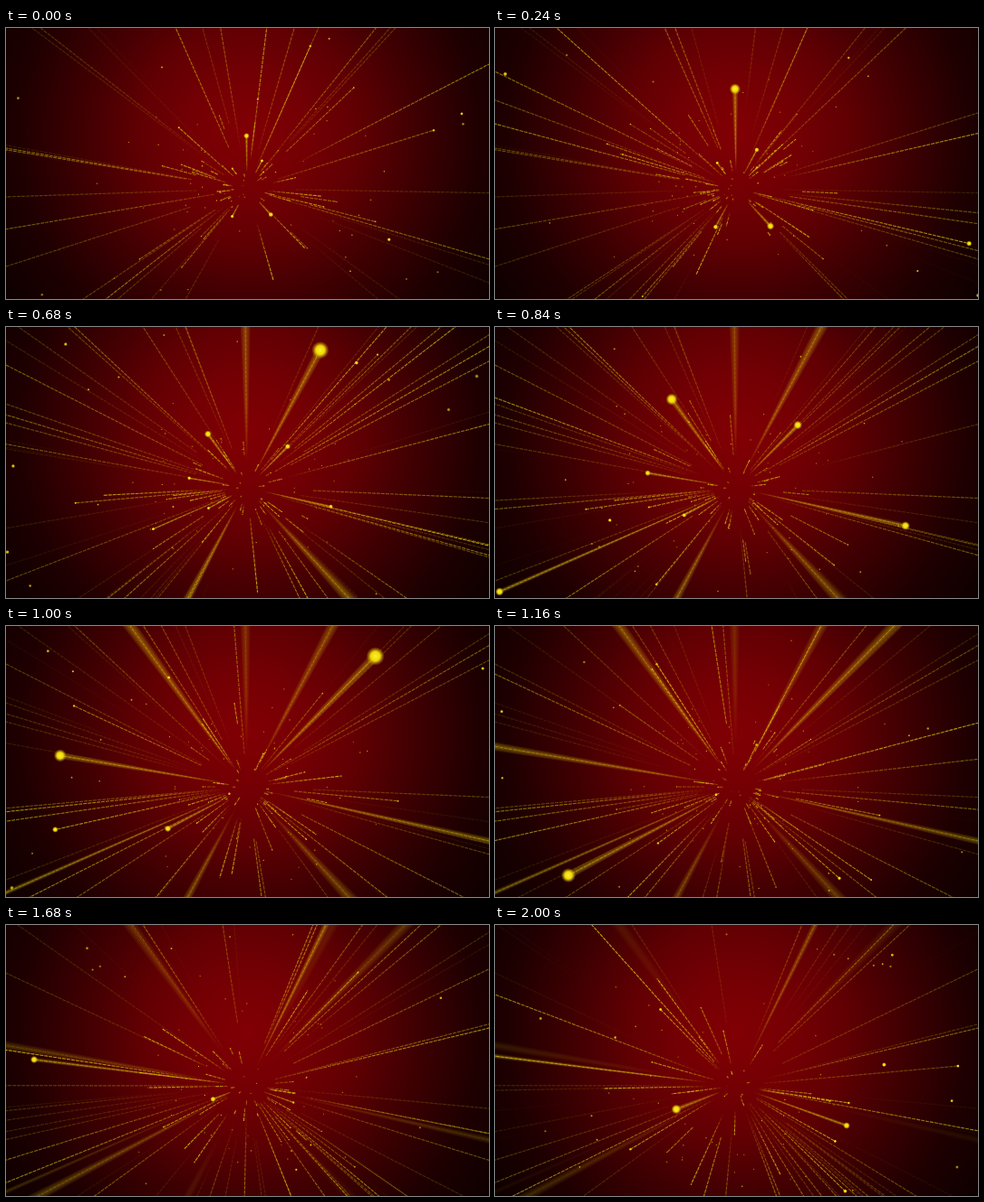
These frames come from a looping animation (533 px wide and 300 px high, 2.04 s). An HTML page with a canvas:

```html
<!DOCTYPE html>
<html lang="en">
<head>
<meta charset="utf-8">
<title>Golden burst</title>
<style>
  html, body { margin: 0; width: 100%; height: 100%; overflow: hidden; background: #0e0000; }
  canvas { display: block; width: 533px; height: 300px; }
</style>
</head>
<body>
<canvas id="stage" width="533" height="300"></canvas>
<script>
const W = 533, H = 300, CX = 266, CY = 178;
const STEP = 40, STEPS = 51, FAR = 340;
const ctx = document.getElementById('stage').getContext('2d');

// The largest sparks; their trails linger as broad beams
const comets = [
  { step: 9, x: 264, y: -20, size: 8 },
  { step: 12, x: 335, y: 253, size: 5.5 },
  { step: 17, x: 190, y: 320, size: 7 },
  { step: 18, x: 371, y: -20, size: 9 },
  { step: 21, x: 195, y: 80, size: 4.8 },
  { step: 21, x: 453, y: 220, size: 3.6 },
  { step: 21, x: 5, y: 293, size: 3.4 },
  { step: 26, x: 460, y: -20, size: 10 },
  { step: 26, x: -20, y: 130, size: 7 },
  { step: 29, x: 81, y: 276, size: 5.8 },
  { step: 36, x: 310, y: 88, size: 2.4 },
  { step: 42, x: 31, y: 149, size: 3 },
  { step: 50, x: 388, y: 222, size: 2.8 },
  { step: 50, x: 200, y: 204, size: 4 }
];

let seed = 7;
function rand(lo, hi) {
  seed = (seed * 16807) % 2147483647;
  return lo + (hi - lo) * seed / 2147483647;
}
function times(n, make) {
  for (let i = 0; i < n; i++) make(i);
}

// Random points in a wide box give more rays to the sides than up and down
const randomAngle = () => Math.atan2(rand(-0.8, 0.8), rand(-1, 1));

// Perspective flight: radius = k / (end - time)
const flight = (angle, end, k) => ({ c: Math.cos(angle), s: Math.sin(angle), end, k });

const trails = [], heads = [];
const addTrail = (path, style) => trails.push({ ...path, ...style });
const addHead = (path, style) => heads.push({ ...path, alpha: 1, ...style });

for (const { step, x, y, size } of comets) {
  const dx = x - CX, dy = y - CY, r = Math.hypot(dx, dy), k = 30000;
  const path = flight(Math.atan2(dy, dx), step * STEP + k / r, k);
  const start = Math.min(20, r * 0.4);
  addTrail(path, { width: 1.3 * size / r, peak: 0.5, life: 1300, start });
  addTrail(path, { width: 0, peak: 0.5, life: 1000, start });
  addHead(path, { size, at: r, start });
}

// Thin rays
times(120, () => {
  const path = flight(randomAngle(), rand(-900, 2700), rand(20000, 34000));
  const start = rand(18, 75);
  addTrail(path, { width: 0, peak: rand(0.3, 0.75), life: rand(700, 1300), start });
  addHead(path, { size: 1, at: 180, start });
});

// Medium sparks, every second one with a trail
times(50, i => {
  const path = flight(randomAngle(), rand(0, 2700), rand(27000, 36000));
  if (i % 2) addTrail(path, { width: 0, peak: 0.75, life: 1000, start: 25 });
  addHead(path, { size: rand(1.4, 2.3), at: 200, start: 40 });
});

// Short dashes close to the centre
times(120, () => {
  const path = flight(rand(0, Math.PI * 2), rand(-100, 3400), rand(6000, 16000));
  addTrail(path, { width: 0, peak: 0.85, life: rand(150, 380), start: rand(5, 45) });
});

// Dust
times(220, () => {
  const path = flight(randomAngle(), rand(0, 3000), rand(40000, 75000));
  addHead(path, { size: rand(0.6, 0.95), at: 150, start: rand(40, 90), alpha: rand(0.55, 1) });
});

function radiusAt(p, time) {
  const left = p.end - time;
  return left <= p.k / FAR ? FAR : p.k / left;
}

const backdrop = ctx.createRadialGradient(268, 118, 0, 268, 118, 320);
[[0, '#810004'], [0.2, '#740004'], [0.38, '#600003'], [0.56, '#420002'], [0.8, '#1e0001'], [1, '#0e0000']]
  .forEach(([at, color]) => backdrop.addColorStop(at, color));

function wedge(p, from, to, width) {
  const a = Math.max(0.4, width * from / 2), b = Math.max(0.4, width * to / 2);
  ctx.beginPath();
  for (const [r, o] of [[from, a], [to, b], [to, -b], [from, -a]]) {
    ctx.lineTo(CX + p.c * r - p.s * o, CY + p.s * r + p.c * o);
  }
  ctx.fill();
}

function drawTrail(p, time) {
  const left = p.end - time;
  if (left + p.life <= 0) return;
  const from = Math.max(p.start, p.k / (left + p.life));
  const to = radiusAt(p, time);
  if (to <= from) return;
  const x1 = CX + p.c * from, y1 = CY + p.s * from;
  const x2 = CX + p.c * to, y2 = CY + p.s * to;
  const paint = ctx.createLinearGradient(x1, y1, x2, y2);
  for (let i = 0; i <= 5; i++) {
    const r = from + (to - from) * i / 5;
    const age = time - p.end + p.k / r;
    const alpha = p.peak * Math.max(0, Math.min(1, 1 - age / p.life));
    paint.addColorStop(i / 5, `rgba(222,192,8,${alpha.toFixed(3)})`);
  }
  if (p.width) {
    // Layered widths soften the edges of a beam
    ctx.fillStyle = paint;
    ctx.globalAlpha = 0.3;
    for (const scale of [1.15, 0.8, 0.45]) wedge(p, from, to, p.width * scale);
    ctx.globalAlpha = 1;
  } else {
    ctx.strokeStyle = paint;
    ctx.beginPath();
    ctx.moveTo(x1, y1);
    ctx.lineTo(x2, y2);
    ctx.stroke();
  }
}

function disc(x, y, r) {
  ctx.beginPath();
  ctx.arc(x, y, r, 0, Math.PI * 2);
  ctx.fill();
}

function drawHead(p, time) {
  const r = radiusAt(p, time);
  if (r >= FAR || r < p.start) return;
  const x = CX + p.c * r, y = CY + p.s * r;
  const size = Math.max(0.6, p.size * r / p.at);
  ctx.globalAlpha = p.alpha;
  if (size < 1.3) {
    ctx.fillStyle = '#dcc010';
    disc(x, y, size);
  } else {
    const glow = ctx.createRadialGradient(x, y, 0, x, y, size * 1.4);
    glow.addColorStop(0, '#fff02c');
    glow.addColorStop(0.5, '#ecd808');
    glow.addColorStop(1, 'rgba(200,150,0,0)');
    ctx.fillStyle = glow;
    disc(x, y, size * 1.4);
  }
  ctx.globalAlpha = 1;
}

// Fine gaps give the thin trails their grain
ctx.lineWidth = 1.1;
ctx.setLineDash([4, 1]);

function frame() {
  const time = Math.floor(performance.now() / STEP) % STEPS * STEP;
  ctx.fillStyle = backdrop;
  ctx.fillRect(0, 0, W, H);
  for (const p of trails) drawTrail(p, time);
  for (const p of heads) drawHead(p, time);
  requestAnimationFrame(frame);
}
frame();
</script>
</body>
</html>
```
